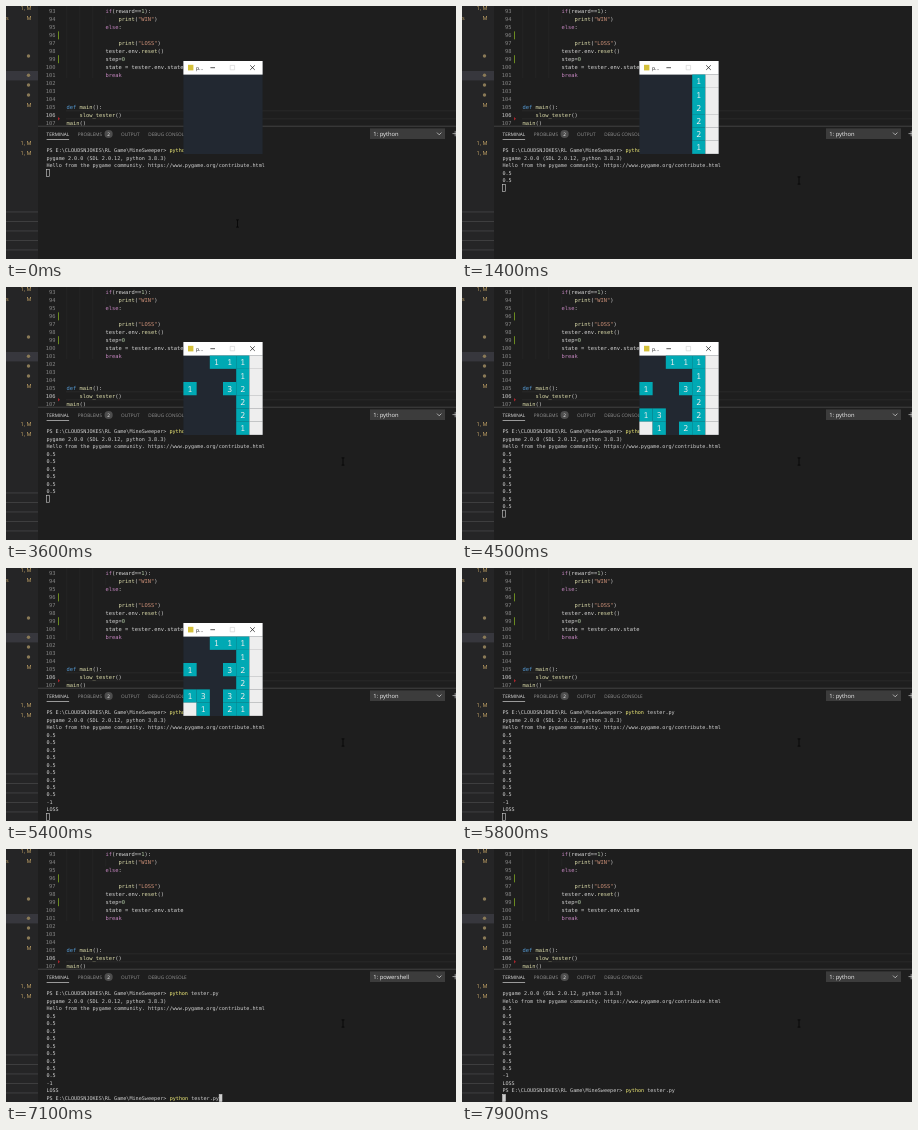
Animation of 450 by 253 pixels, one loop 8 s. Source, as an HTML page:

```html
<!DOCTYPE html>
<html lang="en">
<head>
<meta charset="utf-8">
<title>Minesweeper agent</title>
<style>
  html, body { margin: 0; width: 100%; height: 100%; overflow: hidden; background: #1e1e1e; }
  svg { display: block; width: 100vw; height: 100vh; }
  text { white-space: pre; text-rendering: geometricPrecision; }
  .code, .term { font-family: "DejaVu Sans Mono", monospace; }
  .code { font-size: 5.4px; fill: #d4d4d4; }
  .term { font-size: 5.12px; fill: #d0d0d0; }
  .ui { font-family: "Open Sans", sans-serif; font-size: 4.7px; fill: #969696; }
  .cell { font-family: "Noto Sans Mono", monospace; font-size: 8.2px; fill: #eee; text-anchor: middle; }
</style>
</head>
<body>
<svg id="stage" viewBox="0 0 450 253" preserveAspectRatio="none"></svg>
<script>
const LOOP = 8000;
const stage = document.getElementById('stage');

function add(parent, tag, attrs, text) {
  const el = document.createElementNS('http://www.w3.org/2000/svg', tag);
  for (const k in attrs) el.setAttribute(k, attrs[k]);
  if (text !== undefined) el.textContent = text;
  parent.appendChild(el);
  return el;
}
const rect = (p, x, y, width, height, fill) => add(p, 'rect', { x, y, width, height, fill });
const path = (p, d, stroke, w = 0.7) => add(p, 'path', { d, stroke, 'stroke-width': w, fill: 'none' });
const label = (p, cls, x, y, text, style = '') => add(p, 'text', { class: cls, x, y, style }, text);
const show = (el, on) => { el.style.display = on ? '' : 'none'; };

// Spans are written as "color|text" pairs; an empty color keeps the default.
function spans(p, cls, x, y, parts) {
  const t = label(p, cls, x, y);
  for (const part of parts) {
    const i = part.indexOf('|');
    const s = add(t, 'tspan', {}, part.slice(i + 1));
    if (i > 0) s.style.fill = part.slice(0, i);
  }
  return t;
}

// Sidebar
rect(stage, 0, 0, 32, 253, '#252526');
rect(stage, 0, 65, 32, 9.4, '#37373d');
const GOLD = 'fill:#c9a869;font-size:5.6px';
for (const y of [4, 139, 149]) label(stage, 'ui', 14.5, y, '1, M', GOLD);
label(stage, 'ui', 0, 14, 's', GOLD);
for (const y of [14, 101]) label(stage, 'ui', 20.5, y, 'M', GOLD);
for (const y of [50, 69.3, 79, 89]) add(stage, 'circle', { cx: 22.5, cy: y, r: 1.7, fill: '#8a7a57' });
for (let i = 0; i < 5; i++) rect(stage, 0, 205.6 + i * 9.5, 32, 0.7, '#4a4a4b');

// Editor
const PURPLE = '#c586c0|', YELLOW = '#dcdcaa|', ORANGE = '#ce9178|', BLUE = '#569cd6|', GREEN = '#b5cea8|';
const code = {
  93: [12, PURPLE + 'if', '|(reward==', GREEN + '1', '|):'],
  94: [16, YELLOW + 'print', '|(', ORANGE + '"WIN"', '|)'],
  95: [12, PURPLE + 'else', '|:'],
  97: [16, YELLOW + 'print', '|(', ORANGE + '"LOSS"', '|)'],
  98: [12, '|tester.env.', YELLOW + 'reset', '|()'],
  99: [12, '|step=', GREEN + '0'],
  100: [12, '|state = tester.env.state'],
  101: [12, PURPLE + 'break'],
  105: [0, BLUE + 'def ', YELLOW + 'main', '|():'],
  106: [4, YELLOW + 'slow_tester', '|()'],
  107: [0, YELLOW + 'main', '|()']
};
const lineY = n => 5.5 + (n - 93) * 7.95;
for (const [x, end] of [[60.8, 72], [73.8, 72], [86.8, 72], [99.8, 40]]) {
  path(stage, `M${x} ${x > 99 ? 9.5 : 0}V${x > 99 ? 17.5 : end}`, '#303030', 0.4);
}
path(stage, 'M60 104.8H450M60 112.8H450', '#303030', 0.6);
for (let n = 93; n <= 107; n++) {
  const y = lineY(n) + 1.9;
  label(stage, 'code', 49.6, y, n, `text-anchor:end;fill:${n === 106 ? '#c6c6c6' : '#858585'}`);
  if (code[n]) spans(stage, 'code', 60.5 + code[n][0] * 3.25, y, code[n].slice(1));
}
for (const n of [96, 99]) rect(stage, 52, lineY(n) - 4, 1, 8, '#6a8a20');
add(stage, 'path', { d: 'M52 111l2 1.8l-2 1.8z', fill: '#a8252c' });

// Panel header
rect(stage, 32, 119.8, 418, 133.2, '#1e1e1e');
rect(stage, 32, 119.8, 418, 0.7, '#505050');
label(stage, 'ui', 40.6, 129.7, 'TERMINAL', 'fill:#e7e7e7');
rect(stage, 40.6, 133, 22.5, 0.7, '#d0d0d0');
label(stage, 'ui', 71.8, 129.7, 'PROBLEMS');
add(stage, 'circle', { cx: 102.6, cy: 128, r: 4.1, fill: '#4d4d4d' });
label(stage, 'ui', 102.6, 129.7, '2', 'fill:#fff;text-anchor:middle');
label(stage, 'ui', 115, 129.7, 'OUTPUT');
label(stage, 'ui', 142.3, 129.7, 'DEBUG CONSOLE');
rect(stage, 364, 122.4, 75, 10.6, '#3c3c3c');
const shell = label(stage, 'ui', 367.3, 129.8, '', 'font-size:5.8px;fill:#f0f0f0');
path(stage, 'M431 126.6l2.2 2.2l2.2 -2.2', '#e0e0e0');
path(stage, 'M446.5 127.6H452M449.2 124.9V130.3', '#c5c5c5');

// Terminal
const ROW = 7.46, CHAR = 3.082, LEFT = 40.4;
const PROMPT = 'PS E:\\CLOUDSNJOKES\\RL Game\\MineSweeper> ';
const COMMAND = ['#f2ee7a|python', '| tester.py'];
const steps = [500, 1100, 1600, 2100, 2600, 3170, 3700, 4200, 4700];
const LOSS = 5200, CLOSE = 5500, EXIT = 6300, RECALL = 6900, ENTER = 7700;
const rowY = r => 144.5 + r * ROW;
const term = add(stage, 'g', {});
const lines = [
  [0, '|' + PROMPT, ...COMMAND],
  [0, '|pygame 2.0.0 (SDL 2.0.12, python 3.8.3)'],
  [0, '|Hello from the pygame community. https://www.pygame.org/contribute.html'],
  ...steps.map(at => [at, '|0.5']),
  [LOSS, '|-1'],
  [LOSS, '|LOSS']
].map(([at, ...parts], r) => ({ at, el: spans(term, 'term', LEFT, rowY(r) + 1.9, parts) }));
const last = lines.length;
const prompt = label(term, 'term', LEFT, rowY(last) + 1.9, PROMPT);
const command = spans(term, 'term', LEFT + PROMPT.length * CHAR, rowY(last) + 1.9, COMMAND);
const caret = add(term, 'rect', { width: 2.8, height: 7, stroke: '#cfcfcf', 'stroke-width': 0.6 });

// Game window
const win = add(stage, 'g', {});
rect(win, 177.4, 55, 79.2, 93, '#222831');
rect(win, 177.4, 55, 79.2, 13.6, '#fff');
rect(win, 182, 58.8, 5.4, 5.6, '#d5c13a');
label(win, 'ui', 190, 63.6, 'p...', 'fill:#111;font-size:5px');
path(win, 'M204.4 61.7H209', '#111');
path(win, 'M224.2 59.4h4.4v4.4h-4.4z', '#cfcfcf', 0.6);
path(win, 'M244.2 59.3l4.6 4.6m0 -4.6l-4.6 4.6', '#111');

// Cells opened by each step, as "column row value"; value 0 is blank.
const opened = [
  '432',
  '401 411 422 442 451 500 510 520 530 540 550',
  '301', '201', '323', '021', '352',
  '041 143 050 151',
  '343'
];
const SIZE = 13.2;
const layers = opened.map(set => {
  const g = add(win, 'g', {});
  for (const [c, r, v] of set.split(' ')) {
    const x = 177.4 + c * SIZE, y = 68.6 + r * SIZE;
    rect(g, x, y, SIZE + 0.05, SIZE + 0.05, v === '0' ? '#eeeeee' : '#00a9b4');
    if (v !== '0') label(g, 'cell', x + SIZE / 2, y + 9.7, v);
  }
  return g;
});

// Mouse pointer
const mouse = path(stage, 'M-1.4 -3.6H1.4M0 -3.6V3.6M-1.4 3.6H1.4', '#050505', 0.8);

function draw(t) {
  const scroll = t >= ENTER ? 1 : 0;
  term.setAttribute('transform', `translate(0 ${-scroll * ROW})`);
  lines.forEach((l, i) => show(l.el, t >= l.at && i >= scroll));
  show(prompt, t >= EXIT);
  show(command, t >= RECALL);

  let row = lines.filter(l => t >= l.at).length, col = 0;
  if (t >= ENTER) row++;
  else if (t >= EXIT) col = PROMPT.length + (t >= RECALL ? 16 : 0);
  caret.setAttribute('x', LEFT + col * CHAR + 0.2);
  caret.setAttribute('y', rowY(row) - 3.4);
  caret.setAttribute('fill', t >= EXIT ? '#cfcfcf' : 'none');

  shell.textContent = t >= RECALL && t < ENTER + 100 ? '1: powershell' : '1: python';
  show(win, t < CLOSE);
  layers.forEach((g, i) => show(g, t >= steps[i]));

  const p = Math.min(1, Math.max(0, (t - 100) / 750));
  const e = p * p * (3 - 2 * p);
  mouse.setAttribute('transform', `translate(${231.5 + 105.5 * e} ${217.5 - 43 * e})`);
}

const start = performance.now();
function tick() {
  draw((performance.now() - start) % LOOP);
  requestAnimationFrame(tick);
}
draw(0);
requestAnimationFrame(tick);
</script>
</body>
</html>
```
